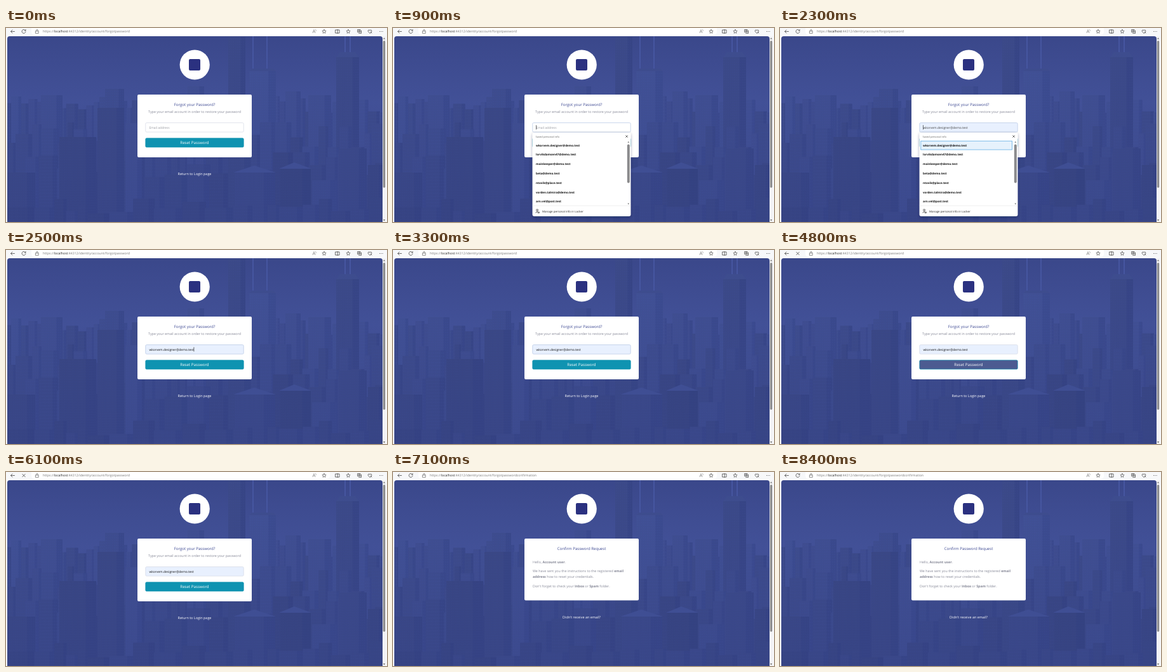
An HTML page for the animation above (8500 ms loop, 600 by 306 pixels).

```html
<!DOCTYPE html>
<html lang="en">
<head>
<meta charset="utf-8">
<title>Forgot password</title>
<style>
  html, body { margin: 0; width: 100%; height: 100%; overflow: hidden; background: #f7f8fa; }
  svg { display: block; width: 100vw; height: 100vh; }
  text { font-family: "Open Sans", "Noto Sans", sans-serif; font-size: 5.35px; fill: #858796; text-rendering: geometricPrecision; white-space: pre; }
  .mid { text-anchor: middle; }
  .title { font-size: 6.1px; fill: #3a4690; }
  .link { font-size: 5.45px; fill: #fff; }
  .value { font-size: 4.95px; }
  .bold { font-weight: 700; }
  .item { font-size: 4.55px; font-weight: 700; fill: #111; }
  .icon { fill: none; stroke: #4a4a4a; stroke-width: .8; stroke-linecap: round; stroke-linejoin: round; }
</style>
</head>
<body>
<svg viewBox="0 0 600 306" preserveAspectRatio="none">
  <defs>
    <linearGradient id="sky" x2="0" y2="1">
      <stop offset="0" stop-color="#3a478a"/>
      <stop offset=".36" stop-color="#44539a"/>
      <stop offset="1" stop-color="#3a478a"/>
    </linearGradient>
    <linearGradient id="haze" x2="0" y2="1">
      <stop offset="0" stop-color="#3c4a8e" stop-opacity=".1"/>
      <stop offset="1" stop-color="#36438a" stop-opacity=".45"/>
    </linearGradient>
    <clipPath id="page"><path d="M2 306V17q0-4 4-4H589q4 0 4 4V306z"/></clipPath>
    <filter id="shadow" x="-10%" y="-10%" width="120%" height="125%">
      <feDropShadow dx="0" dy="1.5" stdDeviation="2" flood-color="#101840" flood-opacity=".4"/>
    </filter>
  </defs>

  <!-- toolbar -->
  <rect width="600" height="306" fill="#f7f8fa"/>
  <rect x="40" y="-4" width="470" height="15" rx="5" fill="#fff"/>
  <g class="icon">
    <path d="M13.5 5.5H7.5M10 3L7.5 5.5 10 8"/>
    <path id="reload" d="M30.6 3.8A3 3 0 1 0 31 6M31 2.5V4.2H29.2"/>
    <path id="stop" d="M25.8 3.3l4.4 4.4M30.2 3.3l-4.4 4.4"/>
    <path d="M46.8 4.8h4.4v3.6h-4.4zM47.8 4.8V3.6a1.2 1.2 0 0 1 2.4 0v1.2" stroke="#777"/>
    <path d="M483 7.6l2-5 2 5M483.7 6h2.6M487.5 2.4q1 .8 .8 2" stroke="#777" stroke-width=".6"/>
    <path d="M519 3h6v5h-6zM522 2.4v6.2"/>
    <path d="M554 2.5h4v4h-4zM555.5 8.4h4V4.2M556 3.5v2M555 4.5h2"/>
    <path d="M573 8.4l-2.8-3q-.4-2.4 1.6-2.4l1.2.8 1.2-.8q2.2 0 1.6 2.4zM574 6l2 2"/>
    <path d="M588.5 5.5h0M590.8 5.5h0M593.1 5.5h0" stroke-width="1.1"/>
    <g id="stars"></g>
  </g>
  <text x="58" y="7.4" style="font-size:5.19px;fill:#777">https://<tspan fill="#222">localhost</tspan>:44312/identity/account/forgotpassword<tspan id="urlTail">confirmation</tspan></text>

  <!-- page backdrop -->
  <g clip-path="url(#page)">
    <rect x="2" y="13" width="591" height="293" fill="url(#sky)"/>
    <g id="city"></g>
    <rect x="2" y="13" width="591" height="293" fill="url(#haze)"/>
  </g>
  <rect x="593" y="13" width="5" height="293" fill="#f3f3f5"/>
  <rect x="593.8" y="20" width="3.4" height="232" rx="1.7" fill="#8b8b8d"/>
  <path d="M593.8 17.6l1.7-2.4 1.7 2.4zM593.8 302l1.7 2.4 1.7-2.4z" fill="#777"/>

  <circle cx="297.2" cy="58" r="23.6" fill="#fff"/>
  <rect x="288" y="49" width="18" height="18" rx="2" fill="#2b3180"/>

  <!-- request form -->
  <g id="request">
    <rect x="207" y="105" width="180" height="99" rx="2" fill="#fff"/>
    <text class="mid title" x="297" y="123.2">Forgot your Password?</text>
    <text class="mid" x="297" y="134.3">Type your email account in order to restore your password</text>
    <rect id="field" x="219.8" y="149.5" width="154.4" height="14.6" rx="1.8" stroke-width=".7"/>
    <text id="value" class="value" x="225.5" y="158.6"></text>
    <rect id="caret" y="153.2" width=".6" height="7" fill="#111"/>
    <rect id="button" x="219.8" y="173.8" width="154.4" height="14.2" rx="1.6" stroke="#0f93b1" stroke-width=".7"/>
    <text class="mid" x="297" y="183.1" style="font-size:6.2px;fill:#fff">Reset Password</text>
    <text class="mid link" x="297" y="232.3">Return to Login page</text>
  </g>

  <!-- saved address list -->
  <g id="dropdown">
    <rect x="219.6" y="165" width="154.8" height="132" rx="3" fill="#fff" filter="url(#shadow)"/>
    <text x="224.5" y="172.6" style="font-size:4.08px;fill:#666">Saved personal info</text>
    <path class="icon" d="M366.5 169.5l3 3M369.5 169.5l-3 3" stroke-width=".7"/>
    <rect id="hover" x="221.8" y="178.2" width="143.8" height="13.8" fill="#e6f2fc" stroke="#4da3e0" stroke-width=".7"/>
    <g id="items"></g>
    <rect x="368.8" y="183.5" width="4" height="61" rx="2" fill="#8b8b8d"/>
    <path d="M369.4 180.8l1.4-2 1.4 2zM369.4 276.4l1.4 2 1.4-2z" fill="#777"/>
    <path d="M219.6 280.3h154.8" stroke="#e2e2e4" stroke-width=".6"/>
    <g class="icon" stroke="#222">
      <circle cx="227" cy="287.2" r="1.4"/>
      <path d="M224.8 291.6q0-2 3-2M228.4 290.2h2v1.6h-2z"/>
    </g>
    <text x="235" y="291" style="font-size:4.45px;fill:#222">Manage personal info in Locker</text>
  </g>

  <!-- confirmation -->
  <g id="confirm">
    <rect x="207" y="105" width="180" height="97.6" rx="2" fill="#fff"/>
    <text class="mid title" x="297" y="123.2">Confirm Password Request</text>
    <text x="220" y="143.8">Hello, <tspan class="bold">Account user</tspan>.</text>
    <text x="220" y="158.3">We have sent you the instructions to the registered <tspan class="bold">email</tspan></text>
    <text x="220" y="166.6"><tspan class="bold">address</tspan> how to reset your credentials.</text>
    <text x="220" y="181.5">Don't forget to check your <tspan class="bold">Inbox</tspan> or <tspan class="bold">Spam</tspan> folder.</text>
    <text class="mid link" x="297" y="231.2">Didn't receive an email?</text>
  </g>
</svg>

<script>
const LOOP = 8500;
// Moments of the story, in ms
const FOCUS = 800, PREVIEW = 1800, PICK = 2400, HOVER = 3300, SUBMIT = 3600, LEAVE = 5300, DONE = 6200;
const FADE = 150;
const ADDRESSES = [
  "wkorvem.designer@demo.test", "lorvikdamsen47@demo.test", "mainkeeper@demo.test",
  "beta@demo.test", "ntovik@place.test", "vorden.talmira@demo.test", "arn.vel@post.test"
];

const $ = id => document.getElementById(id);
const show = (id, on) => $(id).setAttribute("display", on ? "inline" : "none");
const set = (id, attrs) => Object.entries(attrs).forEach(([k, v]) => $(id).setAttribute(k, v));
const ramp = (t, start) => Math.min(1, Math.max(0, (t - start) / FADE));
const mix = (a, b, k) => `rgb(${a.map((v, i) => Math.round(v + (b[i] - v) * k))})`;

let seed = 11;
const random = () => (seed = (seed * 16807) % 2147483647) / 2147483647;

function star(cx, cy) {
  const points = Array.from({ length: 10 }, (_, i) => {
    const r = i % 2 ? 1.5 : 3.3, a = i * Math.PI / 5 - Math.PI / 2;
    return `${(cx + r * Math.cos(a)).toFixed(2)},${(cy + r * Math.sin(a)).toFixed(2)}`;
  });
  return `<polygon points="${points.join(" ")}" stroke-width=".65"/>`;
}

const tone = light => `hsl(229 39% ${light}%)`;

function tower(x, y, w, light, step = 4) {
  let floors = "";
  for (let f = y + 4; f < 306; f += step) floors += `M${x + 1} ${f.toFixed(1)}h${w - 2}`;
  return `<path d="M${x} 306V${y}h${w}V306z" fill="${tone(light)}"/>
    <path d="M${x + w * .72} 306V${y}h${w * .28}V306z" fill="#27347a" opacity=".2"/>
    <path d="${floors}" stroke="${tone(light + 6)}" stroke-width=".8" stroke-dasharray="2 1.2" opacity=".45"/>`;
}

function blocks(top, spread, width, light) {
  let out = "";
  for (let x = 0; x < 595;) {
    const w = width * (.5 + random());
    out += tower(+x.toFixed(1), +(top + random() * spread).toFixed(1), +w.toFixed(1), light + random() * 4 - 2, 5);
    x += w * .95;
  }
  return out;
}

function city() {
  const far = [[350, 14, 27, 38], [383, 68, 42, 42], [520, 46, 36, 38], [476, 106, 36, 41],
    [55, 106, 34, 41], [156, 96, 30, 40], [8, 108, 16, 42], [286, 92, 26, 41], [440, 100, 24, 41]];
  const near = [[84, 172, 58, 36], [144, 126, 42, 37], [188, 150, 26, 41], [0, 228, 46, 37],
    [360, 228, 64, 38], [432, 222, 48, 35], [524, 190, 44, 38], [482, 240, 40, 40], [570, 216, 24, 36]];
  const masts = `<path d="M389 68V13M411 68V12M534 46V13M542 46V13" stroke="${tone(48)}" stroke-width="1.5"/>
    <path d="M520 46l6-8h24l6 8zM383 68l4-4h34l4 4z" fill="${tone(40)}"/>`;
  const roofs = `<path d="M358 228l33-11 34 11zM430 222l24-10 27 10z" fill="${tone(43)}"/>`;
  const draw = list => list.map(b => tower(...b)).join("");
  return blocks(106, 28, 18, 40) + masts + draw(far) + blocks(148, 40, 20, 39) +
    blocks(196, 40, 26, 38) + draw(near) + roofs + blocks(266, 28, 32, 37);
}

$("stars").innerHTML = star(501, 5.6) + star(539, 5.6);
$("city").innerHTML = city();
$("items").innerHTML = ADDRESSES.map((a, i) =>
  `<text class="item" x="225" y="${186.6 + i * 14.8}">${a}</text>`).join("");

function render(t) {
  const open = t >= FOCUS && t < PICK;
  const filled = t >= PREVIEW, picked = t >= PICK;
  const focused = t >= FOCUS && t < SUBMIT;
  const loading = t >= SUBMIT && t < DONE;

  show("request", t < DONE);
  show("confirm", t >= DONE);
  show("urlTail", t >= DONE);
  show("reload", !loading);
  show("stop", loading);
  show("dropdown", open);
  show("hover", filled);

  set("field", { fill: filled ? "#e8f0fe" : "#fff", stroke: focused ? "#b5c6e4" : "#d5d9e6" });
  $("value").textContent = filled ? ADDRESSES[0] : "Email address";
  $("value").style.fill = picked ? "#111" : filled ? "#444" : "#96989f";

  const blinkOn = picked ? t < 3000 : (t - FOCUS - 50 + 1000) % 1000 < 500;
  show("caret", focused && blinkOn);
  const end = picked ? 225.5 + $("value").getComputedTextLength() : 225.1;
  set("caret", { x: end.toFixed(2) });

  const hover = ramp(t, HOVER) - ramp(t, LEAVE);
  set("button", { fill: mix([15, 147, 177], [76, 91, 145], hover) });
}

const origin = performance.now();
function tick() {
  render((performance.now() - origin) % LOOP);
  requestAnimationFrame(tick);
}
tick();
</script>
</body>
</html>
```
